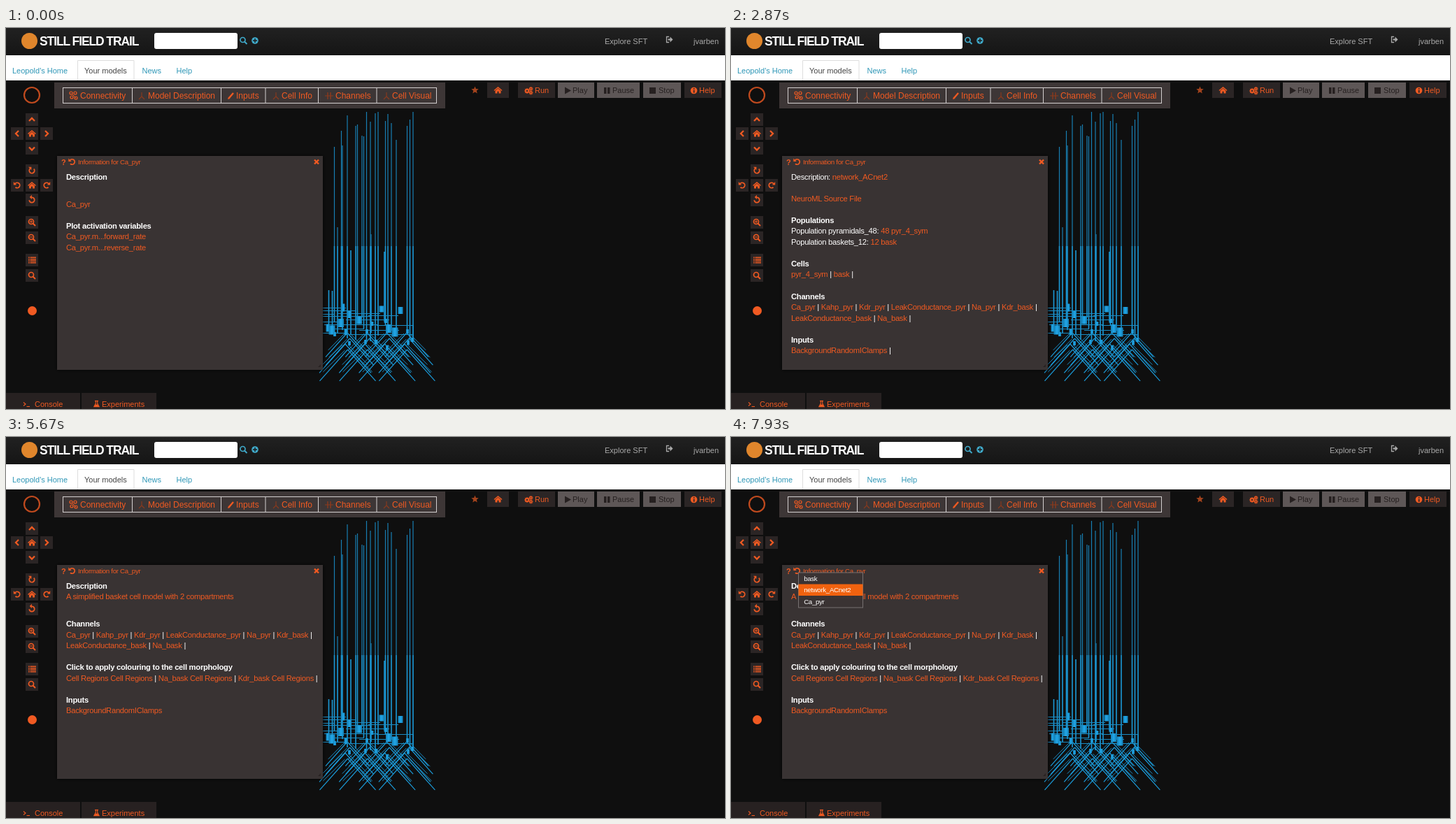
These frames come from a looping animation (1028x545 px, 8000 ms). An HTML page with a canvas:

```html
<!DOCTYPE html>
<html lang="en">
<head>
<meta charset="utf-8">
<title>Network explorer</title>
<style>
  html, body { margin: 0; width: 100%; height: 100%; overflow: hidden; background: #0f0f0f; }
  canvas, svg { position: absolute; left: 0; top: 0; width: 1028px; height: 545px; }
  text { font-family: "Liberation Sans", Arial, sans-serif; white-space: pre; }
  .body { font-size: 11.2px; letter-spacing: -.26px; }
  .small { font-size: 9.7px; letter-spacing: -.32px; }
  .ui { font-size: 11px; }
  .tool { font-size: 12px; }
  .brand { font-size: 17.5px; font-weight: 700; letter-spacing: -1.1px; }
</style>
</head>
<body>
<canvas id="stage" width="1028" height="545"></canvas>
<svg id="layer" width="1028" height="545" viewBox="0 0 1028 545"></svg>
<script>
const LOOP = 8000;
const ORANGE = '#f05a22', WHITE = '#fff', DARK = '#2b2525', DIM = '#8c3a1d', BLUE = '#1b9ad8';
const ctx = document.getElementById('stage').getContext('2d');
const layer = document.getElementById('layer');

// ---------- canvas helpers ----------
function box(x, y, w, h, color) {
  ctx.fillStyle = color;
  ctx.fillRect(x, y, w, h);
}
function line(points, color, width = 1) {
  ctx.strokeStyle = color;
  ctx.lineWidth = width;
  ctx.beginPath();
  for (let i = 0; i < points.length; i += 2) ctx.lineTo(points[i], points[i + 1]);
  ctx.stroke();
}
function poly(points, color) {
  ctx.fillStyle = color;
  ctx.beginPath();
  for (let i = 0; i < points.length; i += 2) ctx.lineTo(points[i], points[i + 1]);
  ctx.fill();
}
function disc(x, y, r, color) {
  ctx.fillStyle = color;
  ctx.beginPath();
  ctx.arc(x, y, r, 0, 7);
  ctx.fill();
}
function ring(x, y, r, color, width, from = 0, to = Math.PI * 2) {
  ctx.strokeStyle = color;
  ctx.lineWidth = width;
  ctx.beginPath();
  ctx.arc(x, y, r, from, to);
  ctx.stroke();
}
function placed(x, y, turn, flip, draw) {
  ctx.save();
  ctx.translate(x, y);
  ctx.rotate(turn);
  ctx.scale(flip, 1);
  draw();
  ctx.restore();
}

// ---------- icons ----------
function chevron(x, y, turn) {
  placed(x, y, turn, 1, () => line([-4, 2, 0, -2, 4, 2], ORANGE, 2.3));
}
function rotation(x, y, turn, flip = 1) {
  placed(x, y, turn, flip, () => {
    ring(0, 0, 3.7, ORANGE, 1.8, -2.5, 2.3);
    poly([-5.2, -5, -5.2, -.6, -.8, -.6], ORANGE);
  });
}
function home(x, y) {
  line([x - 5.5, y + .5, x, y - 4, x + 5.5, y + .5], ORANGE, 1.5);
  poly([x - 4, y + .8, x, y - 2.5, x + 4, y + .8, x + 4, y + 4.5, x + 1, y + 4.5,
    x + 1, y + 1.8, x - 1, y + 1.8, x - 1, y + 4.5, x - 4, y + 4.5], ORANGE);
}
function lens(x, y, color, sign = '') {
  ring(x - 1, y - 1, 3.5, color, 1.7);
  line([x + 1.5, y + 1.5, x + 5, y + 5], color, 2);
  if (sign) line([x - 3, y - 1, x + 1, y - 1], color, 1);
  if (sign === '+') line([x - 1, y - 3, x - 1, y + 1], color, 1);
}
function star(x, y, r, color) {
  const pts = [];
  for (let i = 0; i < 10; i++) {
    const a = i * Math.PI / 5 - Math.PI / 2, d = i % 2 ? r * .45 : r;
    pts.push(x + d * Math.cos(a), y + d * Math.sin(a));
  }
  poly(pts, color);
}
function gear(x, y, r) {
  for (let i = 0; i < 4; i++) {
    placed(x, y, i * Math.PI / 4, 1, () => line([-r - 1, 0, r + 1, 0], ORANGE, 1.2));
  }
  disc(x, y, r, ORANGE);
  disc(x, y, r * .4, DARK);
}
function neuron(x, y) {
  line([x, y - 5, x, y + 1, x - 4, y + 5], DIM, 1.1);
  line([x, y + 1, x + 4, y + 5], DIM, 1.1);
}

// ---------- neural network ----------
// x, top, bottom of the long fibres
const FIBRES = [
  469.5, 170, 420, 474, 285, 436, 479.5, 147, 418, 481, 168, 432, 488, 125, 444, 493, 318, 438,
  500, 140, 446, 502.5, 138, 416, 509, 154, 414, 511.5, 155, 430, 515.5, 120, 450, 521, 134, 448,
  522, 295, 436, 528, 122, 450, 532, 120, 440, 541, 320, 420, 542.5, 133, 425, 546, 123, 430,
  551, 136, 432, 558, 160, 430, 573.5, 140, 434, 577.5, 131, 446, 582, 120, 444,
  461.5, 375, 428, 466.5, 376, 428
];
// x, y, width, height of the cell bodies
const BODIES = [
  448, 446, 8, 14, 460, 429, 5, 11, 466, 432, 9, 13, 482, 400, 5, 11, 479, 422, 8, 12,
  491, 410, 6, 10, 505, 418, 8, 11, 537, 402, 7, 9, 564, 404, 7, 10, 547, 430, 8, 12,
  556, 435, 9, 13, 486, 435, 5, 8, 543, 419, 5, 6, 523, 423, 5, 6, 574, 434, 4, 6,
  581, 446, 5, 6, 575, 450, 4, 7, 529, 449, 5, 6, 545, 457, 4, 6, 514, 449, 4, 6,
  491, 451, 4, 6, 470, 438, 4, 6, 516, 434, 4, 6
];
// x from, x to, y of the sideways branches
const BRANCHES = [
  440, 486, 400.5, 444, 500, 404.5, 436, 470, 409.5, 474, 535, 408.5, 450, 522, 412.5,
  518, 561, 411.5, 436, 478, 420.5, 486, 548, 417.5, 455, 532, 424.5, 530, 582, 425.5,
  462, 512, 430.5, 505, 562, 432.5, 450, 484, 436.5, 490, 582, 438.5
];
function eachOf(list, size, fn) {
  for (let i = 0; i < list.length; i += size) fn(...list.slice(i, i + size));
}
function network() {
  eachOf(FIBRES, 3, (x, top, bottom) => {
    const mid = Math.max(top, 312);
    line([x, top, x, mid], '#187fb2', 1.2);
    line([x, mid, x, bottom], BLUE, 1.6);
  });
  eachOf(BRANCHES, 3, (a, b, y) => line([a, y, b, y], '#1a8cc4', 1));
  line([582, 425, 582, 446], BLUE, 1);
  for (let row = 0; row < 4; row++) {
    const y = 436 + row * 8, reach = 31 + row * 3;
    for (let col = 0; col < 4; col++) {
      const x = 488 + col * 28.3 + (row % 2) * 5 - row * 1.5;
      for (const dir of [-1, 1]) {
        line([x, y, x + dir * reach, y + reach * 1.12], BLUE, 1.2);
        line([x + dir * 4, y + 1, x + dir * reach * .88, y + reach * .8], '#1a8cc4', 1);
      }
    }
  }
  eachOf(BODIES, 4, (x, y, w, h) => {
    const g = ctx.createLinearGradient(x - w / 2, 0, x + w / 2, 0);
    g.addColorStop(0, '#147fb4');
    g.addColorStop(.5, '#22a8ea');
    g.addColorStop(1, '#147fb4');
    box(x - w / 2, y - h / 2, w, h, g);
  });
}

// ---------- static page ----------
function header() {
  const g = ctx.createLinearGradient(0, 0, 0, 39);
  g.addColorStop(0, '#212121');
  g.addColorStop(1, '#151515');
  box(0, 0, 1028, 39, g);
  box(0, 39, 1028, 36, WHITE);
  disc(33.5, 18.5, 11.5, '#e0862c');
  ctx.fillStyle = WHITE;
  ctx.beginPath();
  ctx.roundRect(212, 7, 119, 23, 3);
  ctx.fill();
  lens(339.5, 18, '#3fa9c9');
  disc(356, 18, 4.8, '#3fa9c9');
  line([353, 18, 359, 18], '#1b1b1b', 1.5);
  line([356, 15, 356, 21], '#1b1b1b', 1.5);
  line([948, 12.5, 944.5, 12.5, 944.5, 20.5, 948, 20.5], '#aaa', 1.3);
  line([946.5, 16.5, 951, 16.5], '#aaa', 2.2);
  poly([949.5, 12.5, 953.5, 16.5, 949.5, 20.5], '#aaa');
  line([102.5, 75, 102.5, 46.5, 183, 46.5, 183, 75], '#ddd');
}
function toolbar() {
  box(69, 78, 559, 37, '#3d3636');
  ctx.strokeStyle = '#d4d0d0';
  ctx.lineWidth = 1;
  ctx.strokeRect(81.5, 85.5, 534, 22);
  for (const x of [180.5, 307.5, 371, 446.5, 530]) line([x, 85, x, 108], '#d4d0d0');
  line([94, 94, 100, 100], ORANGE);
  for (const [x, y] of [[93, 93], [99, 93], [94, 99], [100, 100]]) ring(x, y, 2, ORANGE, 1.2);
  [194, 386, 544].forEach(x => neuron(x, 97));
  line([319, 100, 325, 93], ORANGE, 2.4);
  poly([317, 102, 318, 98.5, 320.5, 101], ORANGE);
  for (const x of [460, 464]) line([x, 92, x, 102], DIM, 1.4);
  line([456, 97, 468, 97], DIM, 1);

  star(670.5, 89, 5.5, '#a3431d');
  box(688, 78, 31, 22, DARK);
  home(703.5, 89);
  box(732, 78, 53, 22, DARK);
  gear(745, 90, 2.9);
  gear(750.5, 87, 1.9);
  gear(750.5, 92.5, 1.9);
  for (const [x, w] of [[789, 52], [845, 61], [911, 54]]) box(x, 78, w, 22, '#5e5757');
  poly([799, 84.5, 808, 89.5, 799, 94.5], '#262020');
  box(855, 85, 3.5, 9, '#262020');
  box(860, 85, 3.5, 9, '#262020');
  box(920, 85, 9, 9, '#262020');
  box(970, 78, 53, 22, DARK);
  disc(983.5, 89.5, 4.8, ORANGE);
  box(982.8, 88.7, 1.7, 4, DARK);
  box(982.8, 86, 1.7, 1.6, DARK);
}
function controls() {
  ring(37, 96, 11, '#c04a1e', 2.2);
  for (const y of [122, 142, 163, 195, 216, 237, 269, 291, 323, 345]) box(28, y, 18, 18, DARK);
  for (const y of [142, 216]) [7, 49].forEach(x => box(x, y, 18, 18, DARK));
  chevron(37, 131, 0);
  chevron(16, 151, -Math.PI / 2);
  chevron(58, 151, Math.PI / 2);
  chevron(37, 172.5, Math.PI);
  home(37, 151);
  home(37, 225);
  rotation(37, 204, -Math.PI / 2, -1);
  rotation(16, 225, 0);
  rotation(58, 225, 0, -1);
  rotation(37, 246, Math.PI / 4);
  lens(37, 278, ORANGE, '+');
  lens(37, 300, ORANGE, '-');
  lens(37, 354, ORANGE);
  for (let i = 0; i < 4; i++) {
    box(32, 327.5 + i * 2.5, 1.6, 1.5, ORANGE);
    box(34.5, 327.5 + i * 2.5, 8.5, 1.5, ORANGE);
  }
  disc(37.5, 404.5, 6.5, ORANGE);
}
function panel() {
  ctx.save();
  ctx.shadowColor = '#000';
  ctx.shadowBlur = 4;
  box(73, 183, 380, 306, 'rgba(61,54,54,.95)');
  ctx.restore();
  rotation(94.5, 191.5, 0);
  line([441, 188.5, 447, 194.5], ORANGE, 2.4);
  line([447, 188.5, 441, 194.5], ORANGE, 2.4);
  poly([450, 481, 450, 485, 446, 485], '#292323');
}
function footer() {
  box(0, 522, 106, 23, '#272121');
  box(108, 522, 107, 23, '#272121');
  line([25, 535.5, 28, 538, 25, 540.5], ORANGE, 1.1);
  line([29.5, 541.5, 34, 541.5], ORANGE, 1.1);
  line([127, 533.5, 132, 533.5], ORANGE, 1.2);
  line([128.3, 534, 128.3, 537, 125.8, 541.8, 133.2, 541.8, 130.7, 537, 130.7, 534], ORANGE, 1.1);
  poly([128, 538.5, 131, 538.5, 133, 542, 126, 542], ORANGE);
}

// ---------- text layer ----------
function node(tag, parent, attrs) {
  const el = document.createElementNS('http://www.w3.org/2000/svg', tag);
  for (const k in attrs) el.setAttribute(k, attrs[k]);
  return parent.appendChild(el);
}
function label(parent, x, y, str, fill, cls = 'ui', weight = 400) {
  node('text', parent, { x, y, fill, class: cls, 'font-weight': weight }).textContent = str;
}
const rowY = n => 216.7 + n * 15.53;
function title(g, n, str) {
  label(g, 86, rowY(n), str, WHITE, 'body', 700);
}
function row(g, n, ...parts) {
  const t = node('text', g, { x: 86, y: rowY(n), class: 'body' });
  for (const [str, fill] of parts) node('tspan', t, { fill }).textContent = str;
}
function links(g, n, names, open = true) {
  const parts = [];
  names.forEach((name, i) => {
    parts.push([name, ORANGE]);
    if (open || i < names.length - 1) parts.push([' | ', WHITE]);
  });
  row(g, n, ...parts);
}
function channels(g, n) {
  title(g, n, 'Channels');
  links(g, n + 1, ['Ca_pyr', 'Kahp_pyr', 'Kdr_pyr', 'LeakConductance_pyr', 'Na_pyr', 'Kdr_bask']);
  links(g, n + 2, ['LeakConductance_bask', 'Na_bask']);
}

function pageText() {
  label(layer, 48, 24.5, 'STILL FIELD TRAIL', WHITE, 'brand');
  label(layer, 856, 22.5, 'Explore SFT', '#a8a8a8');
  label(layer, 983, 22.5, 'jvarben', '#a8a8a8');
  label(layer, 9, 64.5, "Leopold's Home", '#2f97b7');
  label(layer, 112, 64.5, 'Your models', '#444');
  label(layer, 194.5, 64.5, 'News', '#2f97b7');
  label(layer, 243.5, 64.5, 'Help', '#2f97b7');
  [[106, 'Connectivity'], [203, 'Model Description'], [329, 'Inputs'], [394, 'Cell Info'],
    [471, 'Channels'], [552, 'Cell Visual']].forEach(([x, s]) => label(layer, x, 101.2, s, ORANGE, 'tool'));
  [[756, 'Run', ORANGE], [810, 'Play', '#262020'], [867, 'Pause', '#262020'],
    [933, 'Stop', '#262020'], [991, 'Help', ORANGE]].forEach(([x, s, c]) => label(layer, x, 93.4, s, c));
  label(layer, 41, 542, 'Console', ORANGE);
  label(layer, 137, 542, 'Experiments', ORANGE);
  label(layer, 79, 195.7, '?', ORANGE, 'ui', 700);
  label(layer, 103, 195.4, 'Information for Ca_pyr', ORANGE, 'small');
}
function channelInfo() {
  const g = node('g', layer);
  title(g, 0, 'Description');
  links(g, 2.5, ['Ca_pyr'], false);
  title(g, 4.5, 'Plot activation variables');
  links(g, 5.5, ['Ca_pyr.m...forward_rate'], false);
  links(g, 6.5, ['Ca_pyr.m...reverse_rate'], false);
  return g;
}
function networkInfo() {
  const g = node('g', layer);
  row(g, 0, ['Description: ', WHITE], ['network_ACnet2', ORANGE]);
  links(g, 2, ['NeuroML Source File'], false);
  title(g, 4, 'Populations');
  row(g, 5, ['Population pyramidals_48: ', WHITE], ['48 pyr_4_sym', ORANGE]);
  row(g, 6, ['Population baskets_12: ', WHITE], ['12 bask', ORANGE]);
  title(g, 8, 'Cells');
  links(g, 9, ['pyr_4_sym', 'bask']);
  channels(g, 11);
  title(g, 15, 'Inputs');
  links(g, 16, ['BackgroundRandomIClamps']);
  return g;
}
function cellInfo() {
  const g = node('g', layer);
  title(g, 0, 'Description');
  links(g, 1, ['A simplified basket cell model with 2 compartments'], false);
  channels(g, 3.5);
  title(g, 7.5, 'Click to apply colouring to the cell morphology');
  links(g, 8.5, ['Cell Regions Cell Regions', 'Na_bask Cell Regions', 'Kdr_bask Cell Regions']);
  title(g, 10.5, 'Inputs');
  links(g, 11.5, ['BackgroundRandomIClamps'], false);
  return g;
}
function menu(x, y, items) {
  const g = node('g', layer);
  node('rect', g, { x, y, width: 92, height: 50, fill: '#3b3434', 'fill-opacity': .96, stroke: '#777171' });
  const bar = node('rect', g, { x, width: 92, height: 16.5, fill: '#f1620f' });
  items.forEach((s, i) => label(g, x + 7.7, y + 12 + i * 16.4, s, WHITE, 'small'));
  return { g, pick: i => {
    bar.setAttribute('visibility', i < 0 ? 'hidden' : 'inherit');
    bar.setAttribute('y', y + Math.max(i, 0) * 16.5);
  } };
}

box(0, 0, 1028, 545, '#0f0f0f');
header();
network();
toolbar();
controls();
panel();
footer();
pageText();
const pages = [channelInfo(), networkInfo(), cellInfo()];
const menus = [
  menu(95.5, 193.5, ['network_ACnet2', 'bask', 'Ca_pyr']),
  menu(98.5, 190.5, ['network_ACnet2', 'bask', 'Ca_pyr']),
  menu(96.5, 194, ['bask', 'network_ACnet2', 'Ca_pyr'])
];

// start time, page, open menu (-1 none), highlighted item (-1 none)
const STEPS = [
  [0, 0, -1, -1], [730, 0, 0, -1], [930, 0, 0, 0], [1530, 1, -1, -1],
  [3130, 1, 1, -1], [3400, 1, 1, 0], [3600, 1, 1, 1], [4270, 2, -1, -1],
  [5800, 2, 2, -1], [6000, 2, 2, 0], [6200, 2, 2, 1], [6400, 2, 2, 2], [7200, 2, 2, 1]
];
function show(el, on) {
  el.setAttribute('visibility', on ? 'visible' : 'hidden');
}
function frame(now) {
  const t = now % LOOP;
  const [, page, open, item] = STEPS.filter(s => s[0] <= t).pop();
  pages.forEach((g, i) => show(g, i === page));
  menus.forEach((m, i) => {
    show(m.g, i === open);
    m.pick(i === open ? item : -1);
  });
  requestAnimationFrame(frame);
}
frame(0);
</script>
</body>
</html>
```
